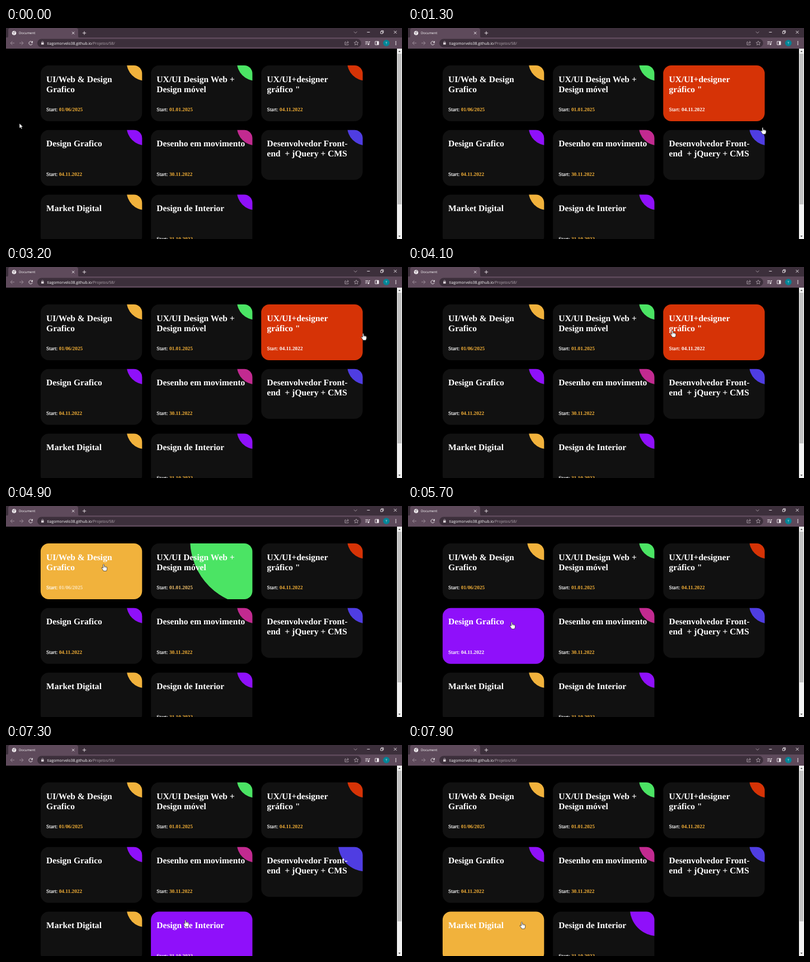
Recreate the animation shown at these times as an HTML page. Size 708 by 378 pixels, loop 8 s.

```html
<!DOCTYPE html>
<html lang="pt">
<head>
<meta charset="utf-8">
<title>Document</title>
<style>
html, body { margin: 0; width: 100%; height: 100%; overflow: hidden; background: #000; }
svg { display: block; }
text { white-space: pre; text-rendering: geometricPrecision; }
.title { font: bold 15.56px "Liberation Serif", "Times New Roman", serif; fill: #fff; }
.date { font: 9.36px "Liberation Serif", "Times New Roman", serif; fill: #fff; stroke: #fff; stroke-width: .2; }
.date tspan { font-weight: bold; stroke: none; }
.ui { font-family: "Open Sans", "Noto Sans", sans-serif; fill: #fff; }
.line { fill: none; stroke: #f3eef2; stroke-width: .9; }
.dim { stroke: #a394a0; }
.soft { stroke: #c9bec6; stroke-width: .7; }
</style>
</head>
<body>
<svg id="stage" width="708" height="378" viewBox="0 0 708 378">
  <rect width="708" height="378" fill="#000"/>
  <g id="cards"></g>

  <g id="scrollbar">
    <rect x="699" y="37" width="9" height="341" fill="#f1f1f1"/>
    <rect x="700" y="46" width="7" height="270" fill="#c1c1c1"/>
    <path d="M701.5 43l2-2.4 2 2.4z" fill="#505050"/>
    <path d="M701.5 372l2 2.4 2-2.4z" fill="#505050"/>
  </g>

  <g id="browser">
    <rect width="708" height="18" fill="#3c2f3b"/>
    <rect y="17" width="708" height="20" fill="#5e4a5b"/>
    <path d="M1 17.5q3 0 3-3V4q0-4 4-4H125q4 0 4 4V14.5q0 3 3 3z" fill="#5e4a5b"/>
    <circle cx="14.5" cy="9" r="3.8" fill="#f4f0f3"/>
    <path d="M12 7.6l2 .8.6 1.6-.8 1.4M15.4 6l-.4 1.4 1.6.6" fill="none" stroke="#5e4a5b" stroke-width=".8"/>
    <text class="ui" x="23" y="11.2" font-size="6">Document</text>
    <path class="line" d="M118 6.8l4.4 4.4M122.4 6.8l-4.4 4.4M136.8 9h6.4M140 5.8v6.4"/>
    <path class="line soft" d="M622 6.5l2.8 2.8 2.8-2.8"/>
    <path class="line" d="M645.5 7.5h5M693.5 5l5 5M698.5 5l-5 5M669.8 6.2h3.8v3.8h-3.8zM671 6V4.8h3.8v3.8h-1"/>

    <path class="line dim" d="M15 27H8.2M11.4 23.7L8.1 27l3.3 3.3M24 27h6.8M27.6 23.7l3.3 3.3-3.3 3.3"/>
    <path class="line" d="M46.6 25a3.2 3.2 0 1 0 .6 3"/>
    <path d="M47.9 23v3.4h-3.4z" fill="#f3eef2"/>
    <rect x="56" y="19.5" width="579" height="15" rx="7.5" fill="#3c2f3b"/>
    <rect x="63" y="26" width="4.6" height="3.8" rx=".5" fill="#d8d0d6"/>
    <path class="line soft" d="M64 26v-1a1.3 1.3 0 0 1 2.6 0v1"/>
    <text class="ui" x="73.5" y="29.6" font-size="6.82">tiagomorvelo38.github.io<tspan fill="#b3a8b0">/Projetos/58/</tspan></text>
    <path class="line soft" d="M608 25h-2v5.2h6V28.5M607.8 28.5q.3-3 4-3M610.2 23.3l2.3 2.2-2.3 2.2"/>
    <path class="line soft" d="M626.2 23.2l1.1 2.5 2.7.3-2 1.8.6 2.7-2.4-1.4-2.4 1.4.6-2.7-2-1.8 2.7-.3z"/>
    <path class="line" d="M642.5 24.5h5M642.5 26.8h5M642.5 29h2.8M649 29v-4.5h2M660 24h6.2v6H660z"/>
    <g fill="#f3eef2">
      <circle cx="648" cy="29.2" r="1.3"/>
      <rect x="663.2" y="24" width="3" height="6"/>
      <circle cx="697" cy="24.3" r=".9"/><circle cx="697" cy="27" r=".9"/><circle cx="697" cy="29.7" r=".9"/>
    </g>
    <circle cx="680" cy="27" r="5.8" fill="#008597"/>
    <text class="ui" x="680" y="29.1" font-size="5.6" text-anchor="middle">T</text>
  </g>

  <g id="cursor">
    <path id="arrow" d="M0 0v8.6l2-1.9 1.4 3.1 1.4-.6-1.4-3.1h2.8z" fill="#fff" stroke="#000" stroke-width=".4"/>
    <g id="hand" transform="translate(1.5 0)" stroke="#000">
      <path d="M-1 .8Q0-.8 1 .8V4.2l1.2-.3.8.6 1.2-.2.7.8q1.3 0 1.3 1.2V9L5 12.2H-.2L-1.6 9.6-3.5 7q-.3-1.3 1-1.2L-1 7z" fill="#fff" stroke-width=".6"/>
      <path d="M1 4.5v2M3 4.8v1.8M4.7 5.3v1.5" fill="none" stroke-width=".4"/>
    </g>
  </g>
</svg>
<script>
const LOOP = 8000, FADE = 500, LAG = 80;   // LAG: the page reacts a little after the pointer
const S = 0.52;                            // page zoom
const WIDTH = 181.4, STEP_X = 197.2, STEP_Y = 115.8;
const RADIUS = 64 * S, OFFSET = 11 * S, GROWTH = 9;
const AMBER = [243, 175, 54];
const $ = id => document.getElementById(id);

const cards = [
  { title: ["UI/Web & Design", "Grafico"], date: "01/06/2025", color: "#f1b23c" },
  { title: ["UX/UI Design Web +", "Design móvel"], date: "01.01.2025", color: "#4be464" },
  { title: ["UX/UI+designer", "gráfico \""], date: "04.11.2022", color: "#d63306" },
  { title: ["Design Grafico"], date: "04.11.2022", color: "#8f10fa" },
  { title: ["Desenho em movimento"], date: "30.11.2022", color: "#c22a90" },
  { title: ["Desenvolvedor Front-", "end  + jQuery + CMS"], color: "#4f3de2" },
  { title: ["Market Digital"], color: "#f1b23c" },
  { title: ["Design de Interior"], date: "31.10.2022", color: "#8f10fa" }
];

// Pointer moves; it rests between them.
const home = { x: 24, y: 171 };
const moves = [
  { from: 400, to: 700, x: 460, y: 172 },
  { from: 700, to: 1000, x: 618, y: 158 },
  { from: 1200, to: 1300, x: 632.5, y: 178 },
  { from: 1300, to: 2000, x: 667, y: 190 },
  { from: 2200, to: 2600, x: 637, y: 119 },
  { from: 3700, to: 4600, x: 265, y: 107 },
  { from: 4600, to: 4700, x: 173, y: 104 },
  { from: 4900, to: 5370, x: 183.5, y: 208 },
  { from: 5700, to: 6560, x: 539.5, y: 226 },
  { from: 6700, to: 7000, x: 430, y: 310 },
  { from: 7000, to: 7620, x: 202, y: 317 }
];

function pointerAt(t) {
  let { x, y } = home;
  for (const m of moves) {
    const k = Math.min(1, Math.max(0, (t - m.from) / (m.to - m.from)));
    x += (m.x - x) * k;
    y += (m.y - y) * k;
  }
  return { x, y };
}

function add(parent, tag, attrs, content) {
  const el = document.createElementNS("http://www.w3.org/2000/svg", tag);
  for (const key in attrs) el.setAttribute(key, attrs[key]);
  if (content) el.textContent = content;
  return parent.appendChild(el);
}

function buildCard(card, i) {
  const x = 61.9 + (i % 3) * STEP_X, y = 67 + Math.floor(i / 3) * STEP_Y;
  const box = { x, y, width: WIDTH, height: card.date ? 100 : 89.2, rx: 28 * S };
  const g = add($("cards"), "g", {});
  add(add(g, "clipPath", { id: "clip" + i }), "rect", box);
  add(g, "rect", { ...box, fill: "#111" });
  const layer = add(g, "g", { "clip-path": `url(#clip${i})` });
  card.box = box;
  card.disc = add(layer, "circle", { cx: x + WIDTH + OFFSET, cy: y - OFFSET, fill: card.color });
  card.title.forEach((line, n) =>
    add(g, "text", { class: "title", x: x + 10.2, y: y + 29.6 + n * 17.9 }, line));
  if (card.date) {
    const text = add(g, "text", { class: "date", x: x + 10.2, y: y + 82.1 }, "Start: ");
    card.label = add(text, "tspan", {}, card.date);
  }
}

function isOver({ x, y, width, height }, t) {
  const p = pointerAt(t - LAG);
  return p.x >= x && p.x <= x + width && p.y >= y && p.y <= y + height;
}

// Times at which the pointer enters or leaves a card, in turn.
function findToggles(card) {
  card.toggles = [];
  for (let t = 0, was = false; t < LOOP; t++) {
    const over = isOver(card.box, t);
    if (over !== was) card.toggles.push(t);
    was = over;
  }
}

// CSS "ease": cubic-bezier(.25, .1, .25, 1)
function ease(x) {
  if (x <= 0) return 0;
  if (x >= 1) return 1;
  const curve = (s, a, b) => 3 * (1 - s) ** 2 * s * a + 3 * (1 - s) * s * s * b + s ** 3;
  let lo = 0, hi = 1;
  for (let i = 0; i < 24; i++) {
    const mid = (lo + hi) / 2;
    if (curve(mid, 0.25, 0.25) < x) lo = mid; else hi = mid;
  }
  return curve(lo, 0.1, 1);
}

function draw(t) {
  for (const card of cards) {
    const p = card.toggles.reduce((sum, at, n) => sum + (n % 2 ? -1 : 1) * ease((t - at) / FADE), 0);
    card.disc.setAttribute("r", RADIUS * (1 + GROWTH * Math.max(0, p)));
    if (card.label) {
      const rgb = AMBER.map(c => Math.round(c + (255 - c) * p));
      card.label.setAttribute("fill", `rgb(${rgb})`);
    }
  }
  const { x, y } = pointerAt(t);
  const linked = cards.some(card => isOver(card.box, t));
  $("cursor").setAttribute("transform", `translate(${x} ${y})`);
  $("arrow").setAttribute("visibility", linked ? "hidden" : "visible");
  $("hand").setAttribute("visibility", linked ? "visible" : "hidden");
}

cards.forEach(buildCard);
cards.forEach(findToggles);
const start = performance.now();
function tick() {
  draw((performance.now() - start) % LOOP);
  requestAnimationFrame(tick);
}
tick();
</script>
</body>
</html>
```
